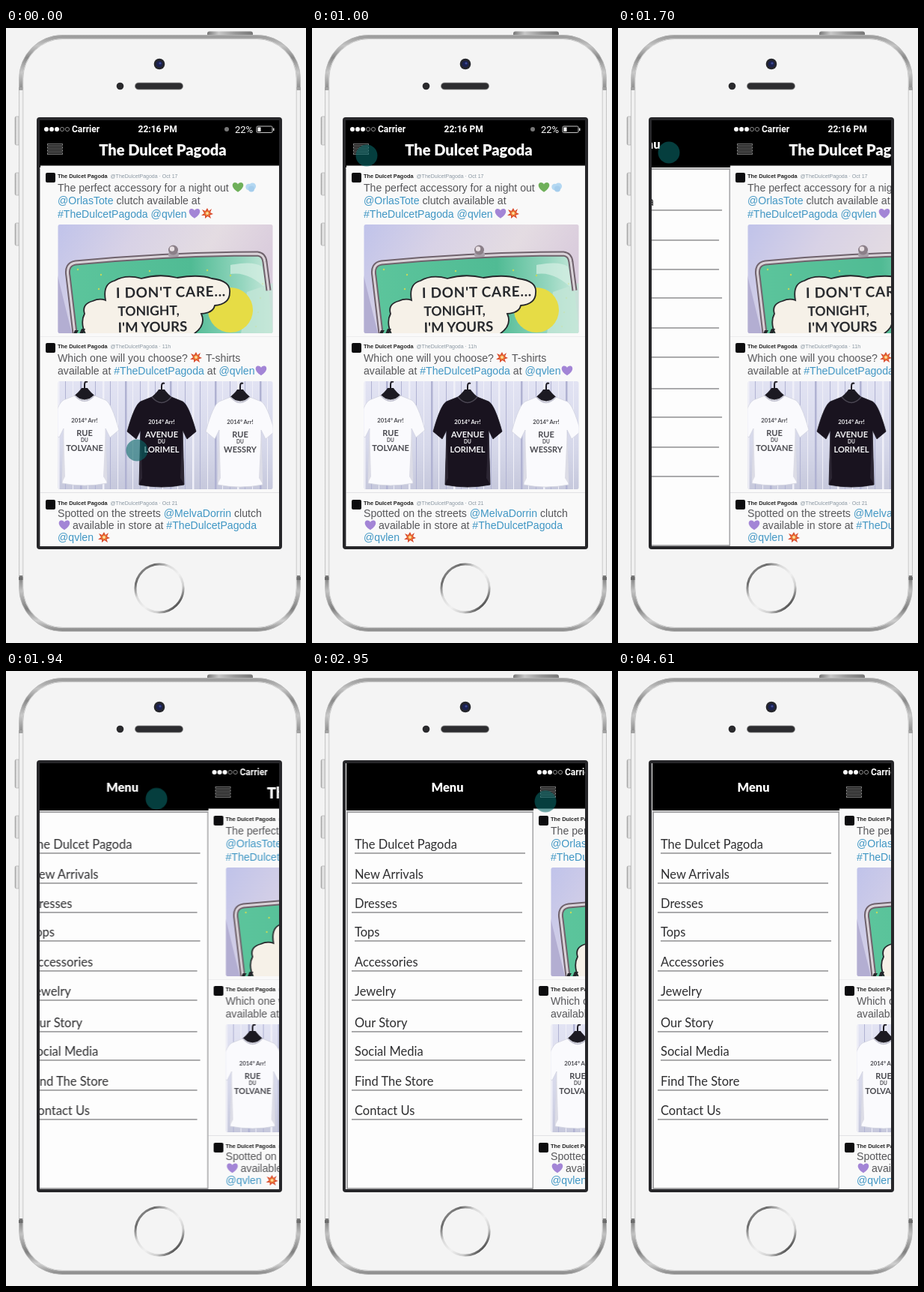
An HTML page for the animation above (4840 ms loop, 401 by 820 pixels).

```html
<!DOCTYPE html>
<html lang="en">
<head>
<meta charset="utf-8">
<title>Slide-out menu</title>
<style>
  html, body { margin: 0; width: 100%; height: 100%; overflow: hidden; background: #f3f3f3; }
  svg { display: block; }
  text { font-family: Lato, sans-serif; }
  .status { font: 700 12px Roboto, sans-serif; fill: #fff; }
  .title { font-weight: 900; fill: #fff; text-anchor: middle; }
  .item { font-size: 16.5px; fill: #2e2e30; }
  .name { font: 700 7.4px "Liberation Sans", Arial, sans-serif; fill: #222; }
  .handle { font: 7px "Liberation Sans", Arial, sans-serif; fill: #8b98a3; }
  .post { font: 14.1px "Liberation Sans", Arial, sans-serif; fill: #565659; }
  .post tspan { fill: #3f96c4; }
  .slogan { font-weight: 700; fill: #26282c; }
  .print { text-anchor: middle; font-weight: 700; }
</style>
</head>
<body>
<svg id="stage" width="401" height="820" viewBox="0 0 401 820"></svg>
<script>
const LOOP = 4840;
const SHOP = 'The Dulcet Pagoda';
const TAG = SHOP.replace(/ /g, '');

const rect = (x, y, w, h, fill, more = '') =>
  `<rect x="${x}" y="${y}" width="${w}" height="${h}" fill="${fill}" ${more}/>`;
const text = (x, y, cls, str, more = '') =>
  `<text x="${x}" y="${y}" class="${cls}" ${more}>${str}</text>`;
const path = (d, fill, more = '') => `<path d="${d}" fill="${fill}" ${more}/>`;
const disc = (x, y, r, fill, more = '') => `<circle cx="${x}" cy="${y}" r="${r}" fill="${fill}" ${more}/>`;
const at = (x, y, inner) => `<g transform="translate(${x} ${y})">${inner}</g>`;
const range = n => [...Array(n).keys()];

const stops = list => list.map(([o, c]) => `<stop offset="${o}" stop-color="${c}"/>`).join('');
const gradient = (id, dir, list) => `<linearGradient id="${id}" ${dir}>${stops(list)}</linearGradient>`;
const down = 'x2="0" y2="1"';

const defs = `<defs>
  <clipPath id="screen">${rect(45, 123, 320, 568, '#000')}</clipPath>
  <clipPath id="photo1">${rect(69.5, 262, 287, 145, '#000', 'rx="2.5"')}</clipPath>
  <clipPath id="photo2">${rect(69.5, 471, 287, 144, '#000', 'rx="2.5"')}</clipPath>
  ${gradient('rim', down, [[0, '#9d9d9d'], [.015, '#c4c4c4'], [.035, '#8a8a8a'], [.06, '#c9c9c9'],
    [.087, '#8d8d8d'], [.088, '#f0f0f0'], [.908, '#f0f0f0'], [.909, '#777'], [.935, '#c2c2c2'],
    [.965, '#808080'], [.985, '#cfcfcf'], [1, '#8f8f8f']])}
  ${gradient('key', '', [[0, '#9b9b9b'], [.35, '#e9e9e9'], [1, '#bdbdbd']])}
  ${gradient('power', '', [[0, '#777'], [.25, '#c9c9c9'], [.6, '#9a9a9a'], [1, '#777']])}
  ${gradient('home', 'x2="1" y2="1"', [[0, '#b5b5b5'], [.2, '#6a6a6a'], [.36, '#d9d9d9'],
    [.55, '#f0f0f0'], [.72, '#cfcfcf'], [.86, '#555'], [1, '#aaa']])}
  ${gradient('room', 'x2="1" y2=".3"', [[0, '#c0c3ea'], [.35, '#d8d2e6'], [.7, '#e4dce2'], [1, '#d9cbdc']])}
  ${gradient('green', '', [[0, '#5cc59c'], [.6, '#50bb94'], [.85, '#95d6bf'], [1, '#cdeade']])}
  ${gradient('wall', down, [[0, '#e2e3f3'], [.6, '#d6d8ea'], [1, '#c6c8dc']])}
</defs>`;

function phone() {
  const keys = [[118, 38], [193, 30], [260, 30]]
    .map(([y, h]) => rect(12, y, 7, h, 'url(#key)', 'rx="2" stroke="#b0b0b0" stroke-width=".7"')).join('');
  const bands = [[79, '#a2a2a2'], [732, '#6c6c6c']]
    .map(([y, c]) => rect(17, y, 5.5, 4, c) + rect(388.5, y, 5.5, 4, c)).join('');
  return rect(269, 4.5, 61, 8, 'url(#power)', 'rx="3"') + keys +
    rect(20, 11.8, 371, 790.4, '#f4f4f4', 'rx="56" stroke="url(#rim)" stroke-width="5"') +
    rect(17.5, 9.5, 376, 795, 'none', 'rx="58" stroke="#b9b9b9" stroke-width=".8"') +
    rect(22.8, 14.6, 365.4, 784.8, 'none', 'rx="53" stroke="#c4c4c4" stroke-width=".9"') + bands +
    disc(205, 48, 7.3, '#25262c') + disc(205, 48, 4.3, '#1b2150') + disc(206, 47, 1.6, '#3d4a94') +
    disc(152.5, 77.5, 4.8, '#29292c') +
    rect(172.5, 73, 64, 9, '#2c2c2f', 'rx="4.5" stroke="#8c8c8c" stroke-width=".8"') +
    disc(205, 747, 32, 'none', 'stroke="url(#home)" stroke-width="3"') +
    rect(41, 119, 328, 576, '#262629', 'rx="4"') + rect(45, 123, 320, 568, '#fdfdfd');
}

// Small pictograms
const heart = (x, y, fill) =>
  at(x, y, path('M0 6.8C-10 .5-8-6-4-6-2-6-.4-5 0-3.4.4-5 2-6 4-6 8-6 10 .5 0 6.8Z', fill));
const spikes = 'M0-7 2-3 6-6 4-1 8 1 3.5 2.5 5 7 .5 4-3 7-3 3-8 3-4 0-7-5-2.5-3Z';
const burst = (x, y) => at(x, y, path(spikes, '#d9482b') +
  path(spikes, '#f08a3c', 'transform="scale(.6)"') + disc(0, 0, 1.7, '#fbe6a8'));
const cloud = (x, y) => at(x, y, disc(-2.5, 0, 4.2, '#b4d8f2') + disc(2.5, -1, 4.6, '#b4d8f2') +
  disc(1, 2.5, 4, '#a5cdec'));
const PURPLE = '#a385d6';

const post = (x, y, str) =>
  text(x, y, 'post', str.replace(/[@#]\w+/g, tag => `<tspan>${tag}</tspan>`));
const postHead = (y, when) => rect(53, y, 13, 13, '#0c0c0e', 'rx="2"') +
  text(69, y + 6.7, 'name', SHOP) + text(139.5, y + 6.7, 'handle', `@${TAG} · ${when}`);

function clutchPhoto() {
  const flecks = range(34).map(i => {
    const x = 96 + (i * 71) % 250, y = 322 + (i * 37) % 80;
    return disc(x, y, 1.2, '#c3d95c');
  }).join('');
  const frame = 'M92 407 83 331Q80 315 93 313Q220 301 336 301Q345 302 346 312L351 350';
  const bubble = 'M106 408Q99 392 105 381Q101 368 116 364Q125 360 133 363Q129 341 145 337Q160 328 181 334' +
    'Q205 327 229 333Q258 328 275 334Q301 337 299 353Q299 368 279 370Q277 380 261 381Q268 396 251 408Z';
  return `<g clip-path="url(#photo1)">` + rect(69, 262, 288, 146, 'url(#room)') +
    path('M69 330 88 407H69Z', '#b3aed2') +
    path(frame + 'L357 408Z', 'url(#green)') + flecks +
    path('M300 316Q330 310 342 318L350 350Q325 324 300 328Z', '#d6efe4', 'opacity=".7"') +
    path('M322 352 357 340V408H314Z', '#c4e6d8', 'opacity=".8"') +
    disc(300, 376, 30, '#e6dc45') +
    path(frame, 'none', 'stroke="#6f626c" stroke-width="7"') +
    path(frame, 'none', 'stroke="#d9d2d8" stroke-width="3"') +
    rect(217, 299, 14, 6, '#a79fa8', 'rx="2"') + disc(223.5, 296, 6.5, '#8b7f88') +
    disc(222, 294.5, 3.2, '#e9e0e4') +
    path(bubble, '#f6f1e8', 'stroke="#24262a" stroke-width="1.8"') +
    path('M92 403h5l-3 5h-4ZM101 401h5l-3 7h-5Z', '#24262a') +
    `<g transform="rotate(-1 150 360)">` +
    text(147, 360, 'slogan', 'I DON\'T CARE...', 'font-size="19" letter-spacing=".7"') +
    text(149, 384, 'slogan', 'TONIGHT,', 'font-size="17.5"') +
    text(149, 406, 'slogan', 'I\'M YOURS', 'font-size="18.5"') + '</g></g>';
}

function shirt(x, y, dark, words) {
  const [top, mid, low] = words;
  const fill = dark ? '#19131f' : '#fafafd';
  const ink = dark ? '#f2f2f4' : '#4a4a50';
  const body = 'M-13 0-28 6Q-36 10-46 46L-34 56-28 44-30 117Q0 123 30 117L28 44 34 56 46 46Q36 10 28 6L13 0' +
    'Q0 12-13 0Z';
  const label = (dy, size, str) => text(0, dy, 'print', str, `fill="${ink}" font-size="${size}"`);
  return at(x, y,
    path('M0-3V-14Q0-20 4-18', 'none', 'stroke="#1c1a22" stroke-width="2"') +
    path('M-18 4Q-6-6-4-10H4Q6-6 18 4Q0 12-18 4Z', '#1c1a22') +
    path(body, fill, `stroke="${dark ? '#15121b' : '#d2d3e0'}" stroke-width=".8"`) +
    path('M-28 44-26 108-30 116ZM28 44 25 108 30 116Z', dark ? '#2c2633' : '#dcdce6') +
    path('M-13 0Q0 15 13 0', 'none', `stroke="${dark ? '#4a4652' : '#c2c2d0'}" stroke-width="1.5"`) +
    label(36, 7.6, '2014º Arr!') + label(54, 11, top) + label(61.5, 6.5, mid) + label(74, 11, low));
}

function shirtPhoto() {
  const planks = range(29).map(i =>
    rect(69 + i * 10, 471, i % 3 ? 1 : 2.5, 144, i % 2 ? '#b0b2d2' : '#f0f0f8')).join('');
  return `<g clip-path="url(#photo2)">` + rect(69, 471, 288, 144, 'url(#wall)') + planks +
    shirt(105, 490, false, ['RUE', 'DU', 'TOLVANE']) +
    shirt(208, 492, true, ['AVENUE', 'DU', 'LORIMEL']) +
    shirt(313, 492, false, ['RUE', 'DU', 'WESSRY']) + '</g>';
}

function feed() {
  const signal = range(5).map(i => i < 3 ? disc(54 + i * 7, 135, 3, '#fff')
    : disc(54 + i * 7, 135, 2.6, 'none', 'stroke="#aaa" stroke-width=".8"')).join('');
  const burger = range(4).map(i =>
    rect(55.5, 154.5 + i * 4, 20, 2, 'none', 'stroke="#858585" stroke-width=".9"')).join('');
  const bar = rect(45, 123, 321, 60.5, '#000') + signal +
    text(88, 139, 'status', 'Carrier') + text(176.5, 139, 'status', '22:16 PM') +
    disc(295, 135, 3, '#777') + text(306, 139.5, 'status', '22%', 'style="font-weight:400;font-size:13px"') +
    rect(335, 131, 21, 8.5, 'none', 'rx="1.5" stroke="#ddd" stroke-width=".9"') +
    rect(336.5, 132.5, 4, 5.5, '#fff') + rect(357, 133.5, 1.5, 3.5, '#ddd') +
    burger + text(209.5, 170, 'title', SHOP, 'font-size="20.1"');
  return rect(46, 183, 320, 509, '#f9f9f9') + bar +
    postHead(193, 'Oct 17') +
    post(69, 217.5, 'The perfect accessory for a night out') + heart(310, 212, '#6fb05a') + cloud(327, 212) +
    post(69, 235, '@OrlasTote clutch available at') +
    post(69, 252.5, `#${TAG} @qvlen`) + heart(252, 247, PURPLE) + burst(269, 247) +
    clutchPhoto() + rect(46, 411, 320, 1, '#ececee') +
    postHead(420, '11h') +
    post(69, 444.5, 'Which one will you choose?') + burst(254, 439) + post(267, 444.5, 'T-shirts') +
    post(69, 462, `available at #${TAG} at @qvlen`) + heart(341, 456.5, PURPLE) +
    shirtPhoto() + rect(46, 619, 320, 1, '#e2e2e5') +
    postHead(629, 'Oct 21') +
    post(69, 652, 'Spotted on the streets @MelvaDorrin clutch') +
    heart(78, 662.5, PURPLE) + post(89, 668, `available in store at #${TAG}`) +
    post(69, 684, '@qvlen') + burst(131, 679);
}

function menu() {
  const rows = [[SHOP, 243], ['New Arrivals', 283], ['Dresses', 322], ['Tops', 360], ['Accessories', 400],
    ['Jewelry', 439], ['Our Story', 481], ['Social Media', 519], ['Find The Store', 559], ['Contact Us', 598]];
  const list = rows.map(([label, y], i) =>
    text(57, y - 6, 'item', label) +
    rect([0, 3, 7].includes(i) ? 57 : 53, y - 1, 228, 1.8, '#a2a2a4')).join('');
  return at(-250, 0, rect(45, 123, 251, 568, '#fdfdfd') + rect(46, 123, 250, 63, '#000') +
    text(181, 161, 'title', 'Menu', 'font-size="16.4"') +
    rect(47, 188, 248.5, 502, '#fdfdfd', 'stroke="#a4a4a6" stroke-width="2"') + list);
}

document.getElementById('stage').innerHTML = defs + phone() +
  `<g clip-path="url(#screen)"><g id="slider">${menu()}${feed()}</g></g>` +
  disc(0, 0, 14.5, 'rgb(8,104,104)', 'id="touch" fill-opacity=".6"');

// Rows: time in ms, x, y, easing towards the next row
const EASE_IN_OUT = 'cubic-bezier(.4,0,.2,1)';
const tracks = {
  slider: [
    [0, 0, 0], [1535, 0, 0, 'ease'], [2190, 250, 0], [LOOP, 250, 0]
  ],
  touch: [
    [0, 175, 563], [310, 175, 563, 'cubic-bezier(.35,.1,.6,.9)'],
    [880, 82, 188], [1000, 73, 170, 'ease-out'], [1290, 68, 166],
    [1700, 68, 166, 'cubic-bezier(.4,0,.3,1)'], [2290, 312, 174],
    [2930, 312, 174, 'ease-in-out'], [3270, 315.5, 141.5, 'ease-in'],
    [3430, 319, 149], [3550, 321, 168, 'ease-out'], [3610, 322, 172, 'ease-in-out'],
    [3840, 321.5, 159.5], [3980, 321.5, 159.5, EASE_IN_OUT],
    [4620, 383, 838], [LOOP, 383, 838]
  ]
};
for (const [id, rows] of Object.entries(tracks)) {
  const frames = rows.map(([t, x, y, easing = 'linear']) =>
    ({ offset: t / LOOP, transform: `translate(${x}px, ${y}px)`, easing }));
  document.getElementById(id).animate(frames, { duration: LOOP, iterations: Infinity });
}
</script>
</body>
</html>
```
